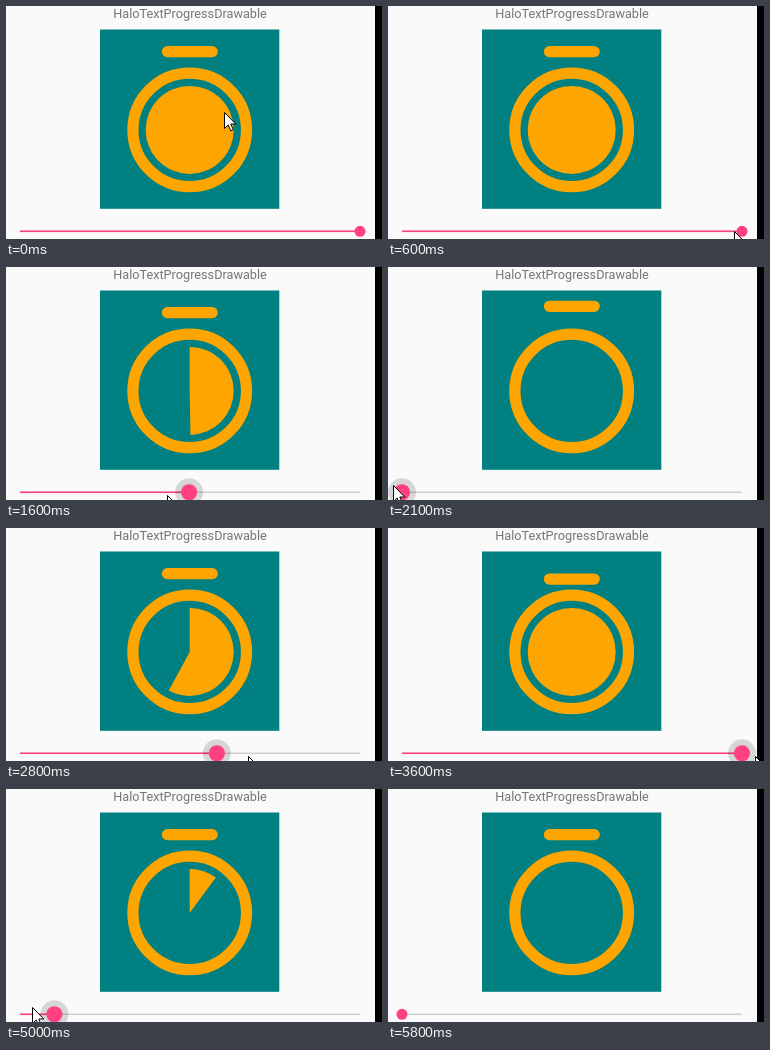
An HTML page with a canvas that plays this animation: 376x233 px, repeating every 6100 ms.

```html
<!DOCTYPE html>
<html lang="en">
<head>
<meta charset="utf-8">
<title>Progress timer</title>
<style>
  html, body { margin: 0; width: 100%; height: 100%; overflow: hidden; background: #fafafa; }
  canvas { display: block; width: 376px; height: 233px; }
</style>
</head>
<body>
<canvas id="stage" width="376" height="233"></canvas>
<script>
const ctx = document.getElementById('stage').getContext('2d');
const LOOP = 6100, STEP = 100, LAST = 5800;
const PRESS = 1000, RELEASE = 5200;
const TAU = Math.PI * 2;
const PINK = '#ff4081', ORANGE = '#ffa500', TEAL = '#008080';
const TRACK = { left: 14, right: 354, y: 225.3 };
const DIAL = { x: 183.7, y: 123.9 };

// Each drag takes the progress to a new value; power shapes its pace
const drags = [
  { start: PRESS, end: 2040, to: 0, power: 1.25 },
  { start: 2400, end: 3080, to: 1, power: 1.03 },
  { start: 3800, end: 4500, to: 0.22, power: 1 },
  { start: 4500, end: 5076, to: 0, power: 4.35 }
];

// The button bounces when the slider reaches an end
const bounces = [2040, 3200, 5076];
const BOUNCE_TIME = 450, BOUNCE_HEIGHT = 8.5;

const clamp = (v, lo, hi) => Math.min(hi, Math.max(lo, v));
const lerp = (a, b, u) => a + (b - a) * u;
const ramp = (t, start, end) => clamp((t - start) / (end - start), 0, 1);
const bezier = (a, b, c, u) => lerp(lerp(a, b, u), lerp(b, c, u), u);

const progressAt = t => drags.reduce(
  (p, d) => lerp(p, d.to, ramp(t, d.start, d.end) ** d.power), 1);

const trackX = progress => lerp(TRACK.left, TRACK.right, progress);

function bounceAt(t) {
  const start = bounces.find(b => t >= b && t < b + BOUNCE_TIME);
  return start === undefined ? 0 : -BOUNCE_HEIGHT * Math.sin(TAU * (t - start) / BOUNCE_TIME);
}

function cursorAt(t) {
  if (t < PRESS) {
    const u = 1 - (1 - ramp(t, 0, 800)) ** 3;
    return [bezier(218, 130, 353, u), bezier(106, 200, 226, u)];
  }
  // While dragging, the pointer runs slightly ahead of the thumb
  const ahead = progressAt(t + 35);
  const drag = drags.findLast(d => t >= d.start);
  const lead = drag.to === 1 ? 13 : -9;
  const leave = ramp(t, 5300, LAST);
  return [
    lerp(trackX(ahead) + lead, 378, leave),
    lerp(clamp(216 + 40 * ahead, 218, 228), 200, leave)
  ];
}

function disc(x, y, r, color) {
  ctx.fillStyle = color;
  ctx.beginPath();
  ctx.arc(x, y, r, 0, TAU);
  ctx.fill();
}

function rect(x, y, w, h, color) {
  ctx.fillStyle = color;
  ctx.fillRect(x, y, w, h);
}

function drawDial(progress, lift) {
  rect(94, 23.5, 179.3, 179.3, TEAL);

  ctx.fillStyle = ORANGE;
  ctx.beginPath();
  ctx.roundRect(155.8, 40 + lift, 56, 11.2, 5.6);
  ctx.fill();

  ctx.strokeStyle = ORANGE;
  ctx.lineWidth = 11.2;
  ctx.beginPath();
  ctx.arc(DIAL.x, DIAL.y, 56.8, 0, TAU);
  ctx.stroke();

  const top = -TAU / 4;
  ctx.beginPath();
  if (progress < 1) ctx.moveTo(DIAL.x, DIAL.y);
  ctx.arc(DIAL.x, DIAL.y, 44, top, top + TAU * progress);
  ctx.fill();
}

function drawSlider(progress, t) {
  const { left, right, y } = TRACK;
  const x = trackX(progress);
  const released = ramp(t, RELEASE, RELEASE + 300);
  const grown = ramp(t, PRESS, PRESS + 500) - released;
  rect(left, y - 0.7, right - left, 1.4, '#cdcdcd');
  rect(left, y - 0.8, x - left, 1.6, PINK);
  disc(x, y, 14 * ramp(t, PRESS - 100, PRESS + 50), `rgba(0,0,0,${0.14 * (1 - released)})`);
  disc(x, y, 5.5 + 2.6 * grown, PINK);
}

function drawCursor(x, y) {
  const shape = [[0, 0], [0, 16], [3.7, 12.5], [6.3, 18.4], [8.8, 17.3], [6.3, 11.5], [11.3, 11.5]];
  ctx.beginPath();
  shape.forEach(([dx, dy]) => ctx.lineTo(Math.round(x) + 0.5 + dx, Math.round(y) + 0.5 + dy));
  ctx.closePath();
  ctx.fillStyle = '#fff';
  ctx.fill();
  ctx.strokeStyle = '#000';
  ctx.lineWidth = 1;
  ctx.stroke();
}

function draw(t) {
  const progress = progressAt(t);

  rect(0, 0, 376, 233, '#fafafa');
  rect(369, 0, 7, 233, '#000');

  ctx.fillStyle = '#757575';
  ctx.font = '12.7px Roboto, sans-serif';
  ctx.textAlign = 'center';
  ctx.fillText('HaloTextProgressDrawable', 184, 12);

  drawDial(progress, bounceAt(t));
  drawSlider(progress, t);
  drawCursor(...cursorAt(t));
}

const begin = performance.now();
function tick() {
  const t = (performance.now() - begin) % LOOP;
  draw(Math.min(LAST, Math.floor(t / STEP) * STEP));
  requestAnimationFrame(tick);
}
tick();
</script>
</body>
</html>
```
